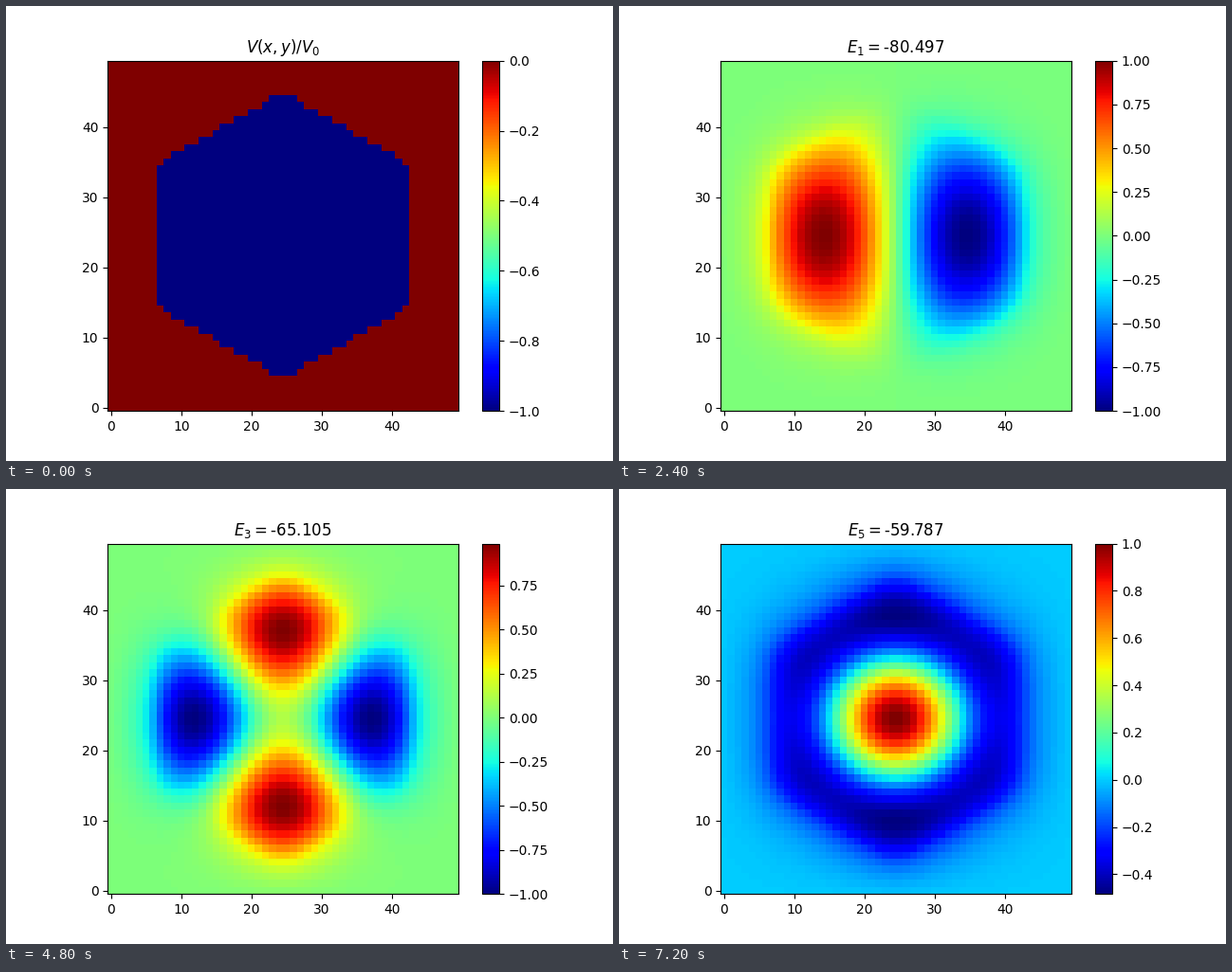
Animation of 640 by 480 pixels, one loop 8 s. Source, as a matplotlib script:

```python
import numpy as np
import matplotlib.pyplot as plt
from matplotlib.animation import FuncAnimation

HALF = 25            # cells from the centre to the edge of the grid
RADIUS = 20.5        # circumradius of the hexagonal well, in cells
DEPTH = 100.0
GROUND = -92.194
STEP_MS = 400
STEPS_PER_STATE = 3
STEPS = 20

# x parity, y parity, level within that symmetry, sign right of centre, energy
STATES = [
    (1, 1, 0, -1, "-92.194"),
    (-1, 1, 0, -1, "-80.497"),
    (1, -1, 0, 1, "-80.152"),
    (1, 1, 1, -1, "-65.105"),
    (-1, -1, 0, 1, "-64.938"),
    (1, 1, 2, 1, "-59.787"),
]

u = np.arange(HALF) + 0.5
X, Y = np.meshgrid(u, u)
in_well = (X <= np.sqrt(3) * (RADIUS - Y)) & (X <= RADIUS * np.sqrt(3) / 2)


def kinetic(parity):
    """Second difference on a half line mirrored with the given parity."""
    t = 2 * np.eye(HALF) - np.eye(HALF, k=1) - np.eye(HALF, k=-1)
    t[0, 0] -= parity
    return t


def kinetic_2d(px, py):
    eye = np.eye(HALF)
    return np.kron(kinetic(py), eye) + np.kron(eye, kinetic(px))


def solve(px, py, scale):
    well = np.diag(-DEPTH * in_well.ravel())
    return np.linalg.eigh(scale * kinetic_2d(px, py) + well)


def fit_scale(scale=610.0):
    """Newton steps on the kinetic factor until the ground level fits."""
    t = kinetic_2d(1, 1)
    for _ in range(4):
        energy, vec = solve(1, 1, scale)
        ground = vec[:, 0]
        scale += (GROUND - energy[0]) / (ground @ t @ ground)
    return scale


def unfold(quad, px=1, py=1):
    upper = np.hstack([px * quad[:, ::-1], quad])
    return np.vstack([py * upper[::-1], upper])


def build_slides():
    slides = [("$V(x,y)/V_0$", unfold(-1.0 * in_well))]
    scale = fit_scale()
    sectors = {}
    for n, (px, py, level, sign, energy) in enumerate(STATES):
        if (px, py) not in sectors:
            sectors[px, py] = solve(px, py, scale)[1]
        quad = sectors[px, py][:, level].reshape(HALF, HALF)
        quad = quad * sign * np.sign(quad[0, 8]) / np.abs(quad).max()
        slides.append((f"$E_{n}=${energy}", unfold(quad, px, py)))
    return slides


slides = build_slides()

fig, ax = plt.subplots(figsize=(6.4, 4.8), dpi=100)
image = ax.imshow(slides[0][1], cmap="jet", origin="lower")
title = ax.set_title(slides[0][0])
fig.colorbar(image, ax=ax)


def update(step):
    text, field = slides[step // STEPS_PER_STATE]
    title.set_text(text)
    image.set_data(field)
    image.set_clim(field.min(), field.max())
    return image, title


anim = FuncAnimation(fig, update, frames=STEPS, interval=STEP_MS,
                     repeat=True, repeat_delay=0, blit=False)
plt.show()
```
